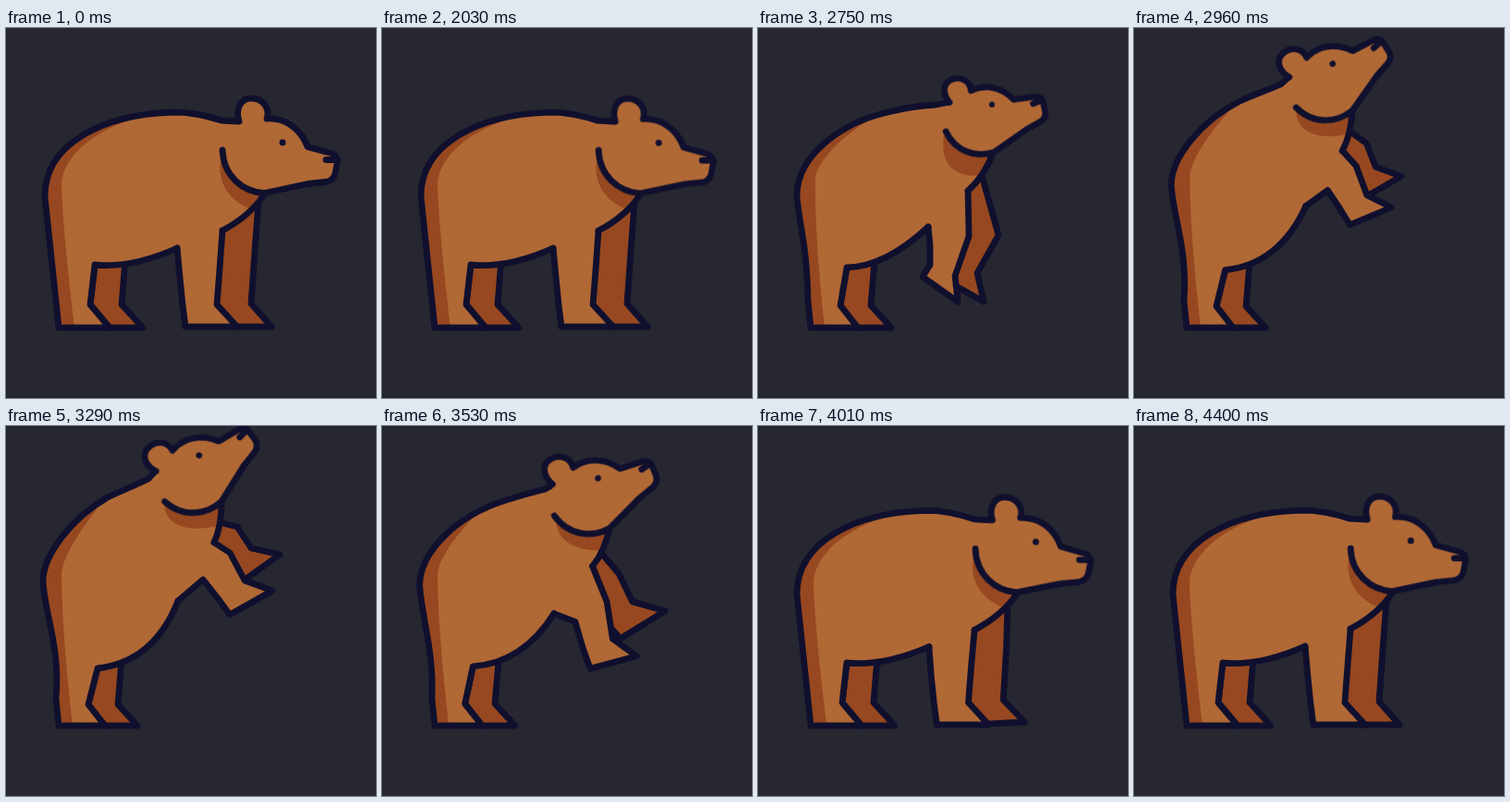
An HTML page without scripts for the animation above (4430 ms loop, 400x400 px).

```html
<!DOCTYPE html>
<html lang="en">
<head>
<meta charset="utf-8">
<title>Bear rearing up</title>
<style>
html, body { margin: 0; width: 100%; height: 100%; overflow: hidden; background: #262730; }
svg { display: block; width: 100%; height: 100%; }
path { fill: none; stroke-linecap: round; stroke-linejoin: round; }
.line { stroke: #10102e; stroke-width: 6.8; vector-effect: non-scaling-stroke; }
.fur { fill: #b06835; }
.dark { fill: #974820; }
.seam { stroke: #b06835; stroke-width: 4; }

.body, .leg, .seam, .rump, .neck, .hind, .far, .head {
  animation: 4430ms cubic-bezier(.4, 0, .6, 1) infinite;
}
.body { animation-name: body; }
.leg { animation-name: leg; }
.seam { animation-name: seam; }
.rump { animation-name: rump; }
.neck { animation-name: neck; }
.hind { animation-name: hind; }
.far { animation-name: far; }
.head { animation-name: head; transform-origin: 299px 124px; }

/* Poses in order: stand, crouch, push off, upright, landing, stand. */
@keyframes body {
  0%, 45.1%, 100% { d: path("M234,219Q264,203 279,180L252,101L233,100C215,94 200,91 182,91C105,93 42,125 42,182C46,220 50,258 54,295L57,324L112,324L91,299L96,256Q136,260 185,238"); }
  56% { d: path("M236,230Q255,222 275,208L282,127L268,121C240,107 210,98 178,98C95,97 47,130 47,182C47,220 48,255 54,295L57,324L110,324L91,299L95,256Q140,261 185,245"); animation-timing-function: cubic-bezier(.5, 0, .8, .7); }
  62.1% { d: path("M227,176Q245,160 254,135L208,80L192,83C175,84 160,86 145,90C95,100 42,135 42,182C45,215 53,235 54,295L57,324L108,324L89,300L96,259Q138,258 184,215"); animation-timing-function: cubic-bezier(.2, .55, .5, 1); }
  70.5%, 74.3% { d: path("M225,126Q233,108 233,83L163,47L154,57C140,64 125,70 110,77C70,100 40,140 40,168C42,205 59,238 54,295L57,324L107,324L89,301L99,262Q160,255 186,189"); animation-timing-function: cubic-bezier(.5, 0, .7, .58); }
  83.75% { d: path("M233,201Q258,187 271,160L237,90L220,90C203,87 192,87 180,87C100,91 42,130 42,182C46,215 51,255 54,295L57,324L111,324L91,299L97,256Q138,258 186,229"); animation-timing-function: cubic-bezier(.12, 1.1, .35, 1.25); }
}
@keyframes leg {
  0%, 45.1%, 100% { d: path("M185,238L188,270L191,300L194,323L250,323L228,299L231,260L234,219"); }
  56% { d: path("M185,245L199,276L194,306L194,323L250,323L233,298L239,273L236,230"); animation-timing-function: cubic-bezier(.5, 0, .8, .7); }
  62.1% { d: path("M184,215L186,235L186,256L178,269L216,296L213,268L228,225L227,176"); animation-timing-function: cubic-bezier(.2, .55, .5, 1); }
  70.5%, 74.3% { d: path("M186,189L213,166L228,185L242,204L288,178L258,167L242,137L225,126"); animation-timing-function: cubic-bezier(.48, 0, .74, .49); }
  81.7% { d: path("M186,216L205,255L206,290L209,318L263,316L241,290L244,240L230,176"); animation-timing-function: linear; }
  83.75% { d: path("M186,229L198,268L200,298L202,323L257,323L235,299L238,252L233,201"); animation-timing-function: cubic-bezier(.12, 1.1, .35, 1.25); }
}
@keyframes seam {
  0%, 45.1%, 100% { d: path("M185,238L234,219"); }
  56% { d: path("M185,245L236,230"); animation-timing-function: cubic-bezier(.5, 0, .8, .7); }
  62.1% { d: path("M184,215L227,176"); animation-timing-function: cubic-bezier(.2, .55, .5, 1); }
  70.5%, 74.3% { d: path("M186,189L225,126"); animation-timing-function: cubic-bezier(.5, 0, .7, .58); }
  83.75% { d: path("M186,229L233,201"); animation-timing-function: cubic-bezier(.12, 1.1, .35, 1.25); }
}
@keyframes rump {
  0%, 45.1%, 100% { d: path("M57,324L54,295C50,258 46,220 42,182C42,132 85,100 150,95C110,104 60,132 60,172Q62,225 74,324"); }
  56% { d: path("M57,324L54,295C48,255 47,220 47,182C47,130 95,101 176,99C112,108 66,130 66,180Q67,230 74,324"); animation-timing-function: cubic-bezier(.5, 0, .8, .7); }
  62.1% { d: path("M57,324L54,295C53,235 45,215 42,182C42,140 85,107 134,94C100,106 66,142 62,160Q61,225 72,324"); animation-timing-function: cubic-bezier(.2, .55, .5, 1); }
  70.5%, 74.3% { d: path("M57,324L54,295C59,238 42,205 40,168C40,142 68,104 104,82C85,107 60,140 60,162Q61,230 72,324"); animation-timing-function: cubic-bezier(.5, 0, .7, .58); }
  83.75% { d: path("M57,324L54,295C51,255 46,215 42,182C42,137 78,111 122,98C95,112 60,140 60,165Q61,225 73,324"); animation-timing-function: cubic-bezier(.12, 1.1, .35, 1.25); }
}
@keyframes neck {
  0%, 45.1%, 100% { d: path("M233,138C225,170 246,190 268,197L279,180"); }
  56% { d: path("M251,152C233,178 240,203 261,216L275,208"); animation-timing-function: cubic-bezier(.5, 0, .8, .7); }
  62.1% { d: path("M201,116C196,148 214,163 242,159L254,135"); animation-timing-function: cubic-bezier(.2, .55, .5, 1); }
  70.5%, 74.3% { d: path("M171,84C172,112 205,115 232,107L233,83"); animation-timing-function: cubic-bezier(.5, 0, .7, .58); }
  83.75% { d: path("M222,127C216,158 232,176 254,188L271,160"); animation-timing-function: cubic-bezier(.12, 1.1, .35, 1.25); }
}
@keyframes hind {
  0%, 45.1%, 100% { d: path("M129,250L125,299L148,324L112,324L91,299L96,256"); }
  56% { d: path("M129,252L124,299L147,324L110,324L91,299L95,256"); animation-timing-function: cubic-bezier(.5, 0, .8, .7); }
  62.1% { d: path("M126,252L122,300L144,324L108,324L89,300L96,259"); animation-timing-function: cubic-bezier(.2, .55, .5, 1); }
  70.5%, 74.3% { d: path("M125,252L121,301L142,324L107,324L89,301L99,262"); animation-timing-function: cubic-bezier(.5, 0, .7, .58); }
  83.75% { d: path("M129,250L124,299L147,324L111,324L91,299L97,256"); animation-timing-function: cubic-bezier(.12, .8, .3, 1); }
}
/* The inner edge stays hidden behind the near leg. */
@keyframes far {
  0%, 45.1%, 100% { d: path("M273,188L269,240L265,298L287,323L246,323L222,299L226,215"); }
  56% { d: path("M275,208L274,268L261,300L283,323L246,323L227,299L229,228"); animation-timing-function: cubic-bezier(.5, 0, .8, .7); }
  62.1% { d: path("M243,163L260,224L237,265L244,296L214,279L207,262L220,176"); animation-timing-function: cubic-bezier(.2, .55, .5, 1); }
  70.5%, 74.3% { d: path("M234,105L250,109L265,132L296,139L257,167L235,143L219,128"); animation-timing-function: cubic-bezier(.48, 0, .74, .49); }
  81.7% { d: path("M240,168L262,208L276,245L316,258L258,290L236,262L224,180"); animation-timing-function: linear; }
  83.75% { d: path("M243,192L264,236L267,280L298,293L247,315L228,299L226,203"); animation-timing-function: cubic-bezier(.12, .8, .3, 1); }
}
@keyframes head {
  0%, 45.1%, 100% { transform: translate(0, 0) rotate(0deg) scale(1); }
  56% { transform: translate(16px, 42px) rotate(23deg) scale(.97); animation-timing-function: cubic-bezier(.5, 0, .8, .7); }
  62.1% { transform: translate(-46px, -41px) rotate(-23deg) scale(.88); animation-timing-function: cubic-bezier(.2, .55, .5, 1); }
  70.5%, 74.3% { transform: translate(-90px, -92px) rotate(-46deg) scale(.95); animation-timing-function: cubic-bezier(.5, 0, .7, .58); }
  83.75% { transform: translate(-17px, -19px) rotate(-8.5deg) scale(.95); animation-timing-function: cubic-bezier(.12, 1.1, .35, 1.25); }
}
</style>
</head>
<body>
<svg viewBox="0 0 400 400">
  <path class="hind dark line"/>
  <path class="far dark line"/>
  <path class="body fur"/>
  <path class="leg fur"/>
  <path class="seam"/>
  <path class="rump dark"/>
  <path class="neck dark"/>
  <path class="body line"/>
  <path class="leg line"/>
  <g class="head">
    <path class="fur line" d="M234,132C235,160 256,177 279,178.500L326,168.500L345,166.500Q354,165.500 356,157L358.500,143Q357,136 348,134.500L326,128.500C318,107 300,97 282,98C286,86 277,76 265,76C253,76 248,88 252,101"/>
    <path class="line" d="M346,142.500H357"/>
    <circle cx="299" cy="123.700" r="3.500" fill="#10102e"/>
  </g>
</svg>
</body>
</html>
```
